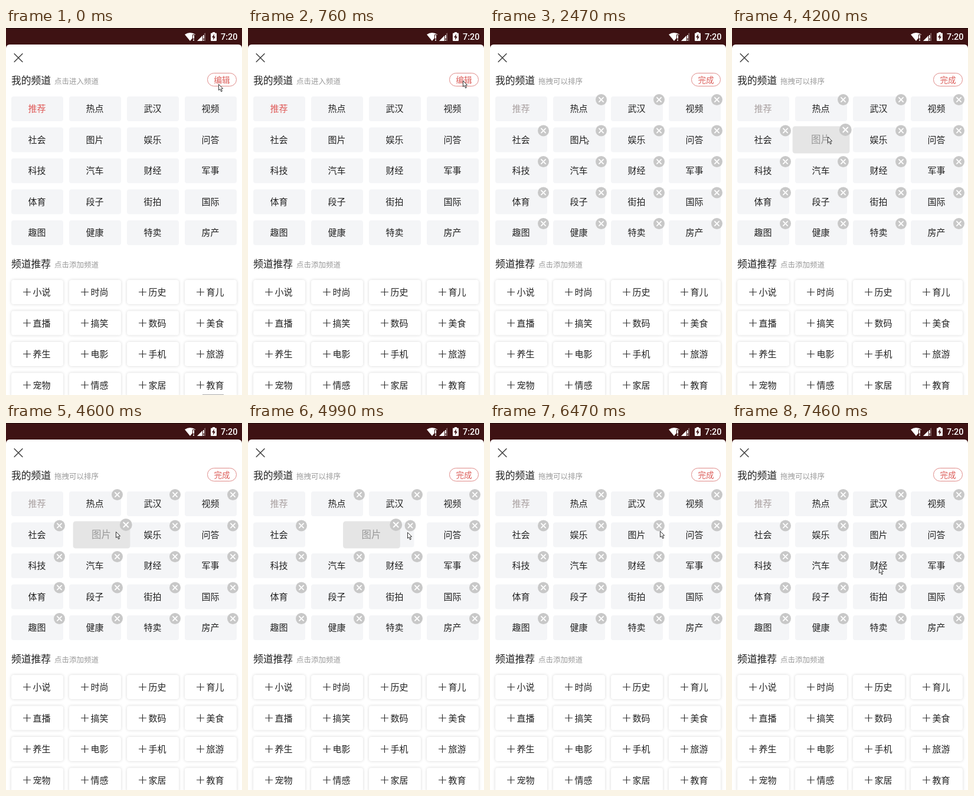
An HTML page with a canvas for the animation above (8 s loop, 400 by 622 pixels).

```html
<!DOCTYPE html>
<html lang="zh-CN">
<meta charset="utf-8">
<style>
html, body { margin: 0; width: 400px; height: 622px; overflow: hidden; }
canvas { display: block; }
</style>
<canvas width="400" height="622"></canvas>
<script>
const c = document.querySelector('canvas').getContext('2d');
const LOOP = 8000;
const COLS = [9, 107, 205, 303], ROW = 52.5, W = 88, H = 42;
const MINE = '推荐 热点 武汉 视频 社会 图片 娱乐 问答 科技 汽车 财经 军事 体育 段子 街拍 国际 趣图 健康 特卖 房产'.split(' ');
const MORE = '小说 时尚 历史 育儿 直播 搞笑 数码 美食 养生 电影 手机 旅游 宠物 情感 家居 教育'.split(' ');

// Key poses: [step, x, y], one step = 78 ms
const POINTER = [[-17, 360, 95], [-15, 363, 89], [-14, 363, 89], [-13, 364, 89], [-1, 364, 89],
  [3, 279, 121], [10, 195, 163], [15, 160, 184.5], [36, 160, 184.5], [37, 162, 184],
  [42, 186, 184], [47, 270, 185], [50, 287, 184], [53, 291, 184], [57, 291, 184],
  [59, 292, 183], [62, 288, 183], [74, 288, 183], [79, 249, 244]];
const CARRY = [[37, 107, 168.5], [42, 118, 168.5], [47, 165.5, 168.5], [50, 216, 168.5],
  [53, 238, 168.5], [57, 238, 168.5], [59, 239, 167], [62, 235, 166.5]];

function pose(keys, k) {
  if (k <= keys[0][0]) return keys[0].slice(1);
  const i = keys.findIndex(p => p[0] >= k);
  if (i < 0) return keys.at(-1).slice(1);
  const [a, ax, ay] = keys[i - 1], [b, bx, by] = keys[i], f = (k - a) / (b - a);
  return [ax + (bx - ax) * f, ay + (by - ay) * f];
}

function text(s, x, cy, size, color, align = 'center', weight = 500) {
  c.font = `${weight} ${size}px "Noto Sans CJK SC", "Noto Sans CJK", sans-serif`;
  c.textAlign = align;
  c.fillStyle = color;
  c.fillText(s, x, cy + size * 0.37);
}

function box(x, y, w, h, r, color) {
  c.beginPath();
  c.roundRect(x, y, w, h, r);
  c.fillStyle = color;
  c.fill();
}

function lines(color, width, ...segs) {
  c.strokeStyle = color;
  c.lineWidth = width;
  c.beginPath();
  for (const [x1, y1, x2, y2] of segs) { c.moveTo(x1, y1); c.lineTo(x2, y2); }
  c.stroke();
}

function cross(x, y, r, color, width) {
  lines(color, width, [x - r, y - r, x + r, y + r], [x - r, y + r, x + r, y - r]);
}

function badge(x, y) {
  c.beginPath();
  c.arc(x, y, 9.5, 0, 7);
  c.fillStyle = '#c8c8c8';
  c.fill();
  cross(x, y, 4.1, '#fff', 1.8);
}

function tile(s, x, y, closable, color = '#222', fill = '#f4f5f7') {
  box(x, y, W, H, 4, fill);
  text(s, x + 43.5, y + 20.5, 15, color);
  if (closable) badge(x + 81.5, y + 5.5);
}

function shape(color, ...pts) {
  c.beginPath();
  for (const [x, y] of pts) c.lineTo(x, y);
  c.closePath();
  c.fillStyle = color;
  c.fill();
}

function statusBar() {
  c.fillStyle = '#3e1213';
  c.fillRect(0, 0, 400, 40);
  c.fillStyle = '#1c0607';
  c.fillRect(0, 0, 400, 1);
  c.beginPath();
  c.moveTo(312, 22);
  c.lineTo(303, 11);
  c.quadraticCurveTo(312, 5, 321, 11);
  c.closePath();
  c.fillStyle = '#fff';
  c.fill();
  shape('#8b7071', [324, 22], [338, 8], [338, 22]);
  shape('#fff', [324, 22], [333, 13], [333, 22]);
  for (const x of [317, 334]) {
    c.fillStyle = '#3e1213';
    c.fillRect(x - 1, 11, 4, 11);
    c.fillStyle = '#fff';
    c.fillRect(x, 12, 2, 6);
    c.fillRect(x, 19.5, 2, 2);
  }
  box(347, 8.5, 10, 13.5, 1, '#fff');
  c.fillRect(350, 7, 4, 2);
  shape('#3e1213', [353, 10], [349, 16], [351.5, 16], [351, 20.5], [355, 14.5], [352.5, 14.5]);
  c.font = '500 14.5px Roboto, sans-serif';
  c.textAlign = 'left';
  c.fillStyle = '#fff';
  c.fillText('7:20', 364, 20);
}

function recommended() {
  text('频道推荐', 9, 399.5, 16.8, '#222', 'left');
  text('点击添加频道', 82, 401, 12.5, '#999', 'left', 400);
  MORE.forEach((s, i) => {
    const x = COLS[i % 4], y = 427 + ROW * (i >> 2);
    c.shadowColor = 'rgba(0,0,0,.16)';
    c.shadowBlur = 5;
    box(x, y, W, H - 1, 4, '#fff');
    c.shadowColor = 'transparent';
    const px = x + 26.5, py = y + 20.5;
    lines('#333', 1.2, [px - 6.5, py, px + 6.5, py], [px, py - 6.5, px, py + 6.5]);
    text(s, x + 51.5, py, 15, '#222');
  });
}

function channels(k, t) {
  const editing = k >= -5, held = k >= 29 && k < 66;
  const u = Math.min(1, Math.max(0, (t - 4890) / 360));
  const shift = 98 * (1 - Math.cos(Math.PI * u)) / 2;
  text('我的频道', 9, 89, 16.8, '#222', 'left');
  text(editing ? '拖拽可以排序' : '点击进入频道', 82, 90, 12.5, '#999', 'left', 400);
  c.beginPath();
  c.roundRect(341.5, 76.5, 49, 22, 11);
  c.strokeStyle = '#df8a88';
  c.lineWidth = 1;
  c.stroke();
  text(editing ? '完成' : '编辑', 366, 87.5, 13.6, '#dc5e5a');

  MINE.forEach((s, i) => {
    let x = COLS[i % 4];
    const y = 116 + ROW * (i >> 2);
    if (s === '图片') {
      if (held) return;
      if (k >= 66) x = COLS[2];
    }
    if (s === '娱乐') x -= shift;
    const color = i ? '#222' : editing ? '#a9a0a0' : '#df5a58';
    tile(s, x, y, editing && i, color);
  });

  if (held) {
    const [x, y] = pose(CARRY, k), scale = k < 30 ? 1.05 : 1.1;
    c.save();
    c.translate(x + W / 2, y + H / 2);
    c.scale(scale, scale);
    tile('图片', -W / 2, -H / 2, true, '#999', '#e5e5e5');
    c.restore();
  }
}

function pointer(x, y) {
  c.save();
  c.translate(x + 0.5, y + 0.5);
  shape('#fff', [0, 0], [0, 10], [2.3, 8], [4.2, 12.3], [5.9, 11.5], [4.1, 7.5], [7.2, 7.2]);
  c.strokeStyle = '#333';
  c.lineWidth = 1;
  c.stroke();
  c.restore();
}

function draw(now) {
  const t = now % LOOP, k = Math.floor((t - 1290) / 78);
  statusBar();
  box(0, 28, 400, 610, 6, '#fff');
  cross(21, 50.5, 7.3, '#444', 1.6);
  channels(k, 1290 + 78 * k + 14);
  recommended();
  if (k < -7) {
    c.fillStyle = '#aaa';
    c.fillRect(333, 621, 36, 1);
  }
  pointer(...pose(POINTER, k));
  requestAnimationFrame(draw);
}
requestAnimationFrame(draw);
</script>
</html>
```
